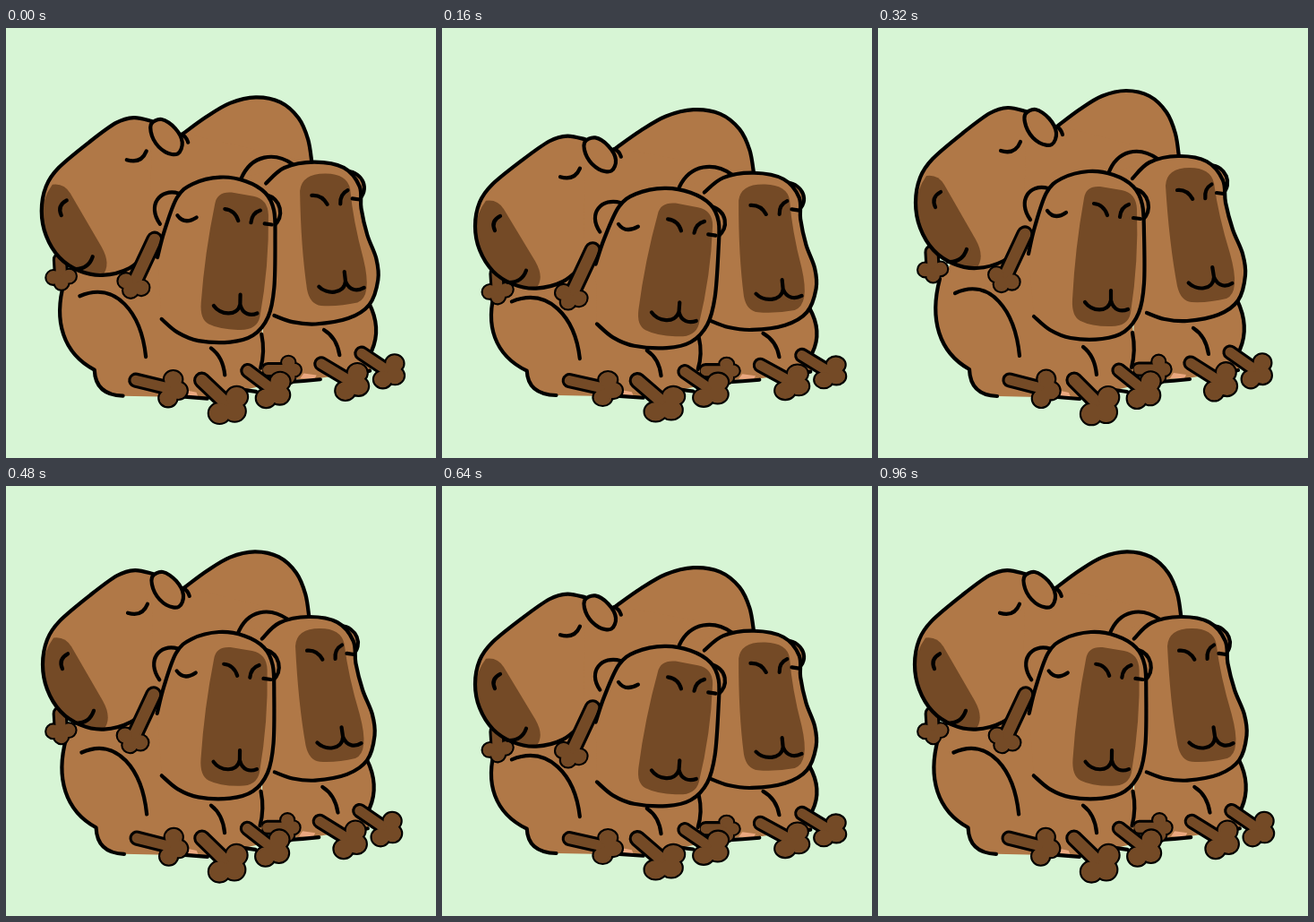
An HTML page that plays this animation: 480x480 px, repeating every 1.04 s.

```html
<!DOCTYPE html>
<html lang="en">
<head>
<meta charset="utf-8">
<title>Dozing capybaras</title>
<style>
  html, body { margin: 0; width: 100%; height: 100%; overflow: hidden; background: #d7f5d5; }
  svg { display: block; width: 100%; height: 100%; }
  path { fill: none; stroke-width: 4.2; stroke-linecap: round; stroke-linejoin: round; vector-effect: non-scaling-stroke; }
  .line { stroke: #000; }
  .fur { fill: #b07847; }
  .dark { fill: #744a26; }
  .pink { fill: #eba880; }
</style>
</head>
<body>
<svg id="stage" viewBox="0 0 480 480"></svg>
<script>
const LOOP = 1040;
const STARTS = [0, 80, 160, 280, 320, 480, 520, 600, 640, 800, 840, 960];

// Amount per pose: 0 is stretched up, 1 is squashed down. Sideways sway lags differently per animal.
const SINK = [.35, .73, 1, .33, 0, .16];
const SWAY = {
  rest: [.45, .85, 1, .3, 0, .2],
  mid: [.3, .9, 1, .7, 0, .2],
  right: [.7, .9, 1, .5, 0, .2]
};

// Full squash at a pivot: how far it moves, and how dx and dy change with x and y.
const head = (at, sway) => ({ at, sway, move: [12, 18], dx: [.05, -.07], dy: [.04, -.05] });
const RULES = {
  midHead: head([250, 190], 'mid'),
  rightHead: head([350, 170], 'right'),
  backHead: { at: [110, 180], sway: 'rest', move: [-5, 27], dx: [0, 0], dy: [0, -.05] },
  backBody: { at: [200, 109], sway: 'rest', move: [-7, 25], dx: [.14, 0], dy: [-.05, 0] },
  paw: { at: [60, 266], sway: 'rest', move: [1, 24], dx: [.03, 0], dy: [-.06, 0] },
  body: { at: [70, 400], sway: 'rest', move: [-9, 0], dx: [.055, 0], dy: [0, -.09] }
};

const stage = document.getElementById('stage');
const layers = [];

function layer(name, ...shapes) {
  const el = document.createElementNS('http://www.w3.org/2000/svg', 'g');
  el.innerHTML = shapes.join('');
  stage.appendChild(el);
  layers.push({ el, rule: RULES[name] });
}

const path = (cls, d, extra = '') => `<path class="${cls}" d="${d}" ${extra}/>`;
const stamp = (x, y, turn, d) => path('line', d, `transform="translate(${x} ${y}) rotate(${turn})"`);

// Smooth curve through a few key points.
function curve(text, closed = false) {
  const p = text.split(' ').map(s => s.split(',').map(Number));
  const n = p.length;
  const at = i => closed ? p[(i + n) % n] : p[Math.max(0, Math.min(n - 1, i))];
  const aim = (a, b, c) => a.map((v, k) => (v + (c[k] - b[k]) / 6).toFixed(2));
  let d = 'M' + p[0];
  for (let i = 0; i < (closed ? n : n - 1); i++) {
    const a = at(i), b = at(i + 1);
    d += `C${aim(a, at(i - 1), b)} ${aim(b, at(i + 2), a)} ${b}`;
  }
  return d + (closed ? 'Z' : '');
}

// A leg ending in three round toes spread around its direction.
function foot(x, y, pawX, pawY, size, width = 13) {
  const dir = Math.atan2(pawY - y, pawX - x);
  const r = 9 * size;
  let toes = '';
  for (const spread of [-1.3, 0, 1.3]) {
    const tx = pawX + 11 * size * Math.cos(dir + spread);
    const ty = pawY + 11 * size * Math.sin(dir + spread);
    toes += `M${tx - r},${ty}a${r},${r} 0 1 1 ${2 * r},0a${r},${r} 0 1 1 ${-2 * r},0`;
  }
  const leg = (color, w) => path('', `M${x},${y}L${pawX},${pawY}`, `style="stroke:${color};stroke-width:${w}"`);
  return leg('#000', width + 4.2) + path('line dark', toes) + leg('#744a26', width - 2) +
    path('dark', toes);
}

const nostrils = (x, y, turn) => stamp(x, y, turn, 'M0,0q11,1 15,13m14,2q1,-11 10,-14');
const mouth = (x, y, turn) => stamp(x, y, turn, 'M-29,2c7,10 26,13 29,-2v-11v11c3,12 12,13 19,10');

// Bodies
layer('body',
  path('fur', 'M286,290L401,300Q418,335 403,360V382L345,391L300,393L285,380Z'),
  path('pink', 'M326,391l4,-6l14,2l-2,4z'),
  path('line', 'M401,304Q415,333 404,359M312,395Q330,394 348,392M352,335Q366,344 369,364M392,384l10,-2'),
  foot(291, 381, 311, 381, .78),
  path('fur', 'M90,250L68,283C58,325 68,362 102,381Q103,410 133,411L225,413L283,400Q288,365 284,330L200,230Z'),
  path('pink', 'M201,410l3,-5l9,2l2,5z'),
  path('line', 'M69,280C57,325 68,362 102,381Q103,410 133,411M200,412L225,414M264,404L278,406'),
  path('line', 'M284,340Q288,360 283,379M229,356Q242,366 244,387'),
  path('line', 'M86,296C125,278 153,315 158,366'));

// Resting animal
layer('paw', foot(60, 250, 61, 267, .82));
layer('backBody',
  path('fur', 'M155,110L201,109L255,76L325,104L336,144L320,200L155,260Z'),
  path('line fur', curve('201,109 225,91 250,76 277,70 303,76 322,94 332,118 336,144')),
  path('line', 'M199,110Q204,112 206,119'));
const backHead = curve('165,93 145,89 125,95 95,117 61,146 47,167 42,195 47,223 62,248 84,263 110,268 140,260 163,240');
layer('backHead',
  path('fur', backHead),
  path('dark', 'M54,165Q67,163 74,175L109,236Q120,256 110,268Q80,270 59,245Q29,200 54,165Z'),
  path('line', backHead),
  path('line', 'M78,261Q94,262 99,247M70,183q-11,6 -6,17M137,137q16,5 22,-10'),
  path('line fur', curve('164,97 176,91 191,101 199,117 194,130 180,128 167,114', true)));

// Right head
layer('rightHead',
  path('line fur', 'M257,163C267,135 292,132 312,146M371,153C388,154 397,174 384,186'),
  path('line fur', curve('284,168 303,150 335,143 367,149 385,170 388,195 396,225 407,252 410,276 402,304 380,320 345,327 320,325 300,318')),
  path('dark', 'M321,176Q322,156 348,156Q371,156 375,173Q380,210 393,252Q405,295 389,302Q369,307 350,306Q338,305 334,288Q325,240 321,176Z'),
  nostrils(334, 181, -11),
  mouth(375, 278, -9),
  path('line', 'M378,184l8,1'));

// Middle head with the arm tucked behind it
layer('paw', foot(164, 230, 142, 277, .9, 15));
layer('midHead',
  path('line fur', 'M170,214C155,193 169,173 190,179M286,179C303,184 307,203 295,215'),
  path('line fur', curve('168,252 175,222 188,184 205,168 235,160 263,164 285,177 295,197 297,230 297,285 291,318 275,339 250,347 215,346 192,337 174,322')),
  path('dark', 'M230,190Q232,176 248,177L272,181Q288,184 289,202Q291,260 282,318Q279,334 258,333Q238,333 226,327Q216,322 217,303Q220,245 230,190Z'),
  nostrils(241, 196, 0),
  mouth(260, 304, 0),
  path('line', 'M189,204q8,11 21,2M285,212l8,1'));

// Feet
layer('body',
  foot(147, 393, 182, 402, 1.05),
  foot(219, 393, 245, 419, 1.25, 15),
  foot(269, 382, 294, 402, 1.15),
  foot(349, 374, 379, 393, 1.15),
  foot(393, 362, 420, 381, 1.05));

function pose(k) {
  for (const { el, rule: { at, sway, move, dx, dy } } of layers) {
    const sx = SWAY[sway][k], sy = SINK[k];
    const shift = (m, d) => m - d[0] * at[0] - d[1] * at[1];
    el.setAttribute('transform', `matrix(${[
      1 + sx * dx[0], sy * dy[0], sx * dx[1], 1 + sy * dy[1],
      sx * shift(move[0], dx), sy * shift(move[1], dy)
    ]})`);
  }
}

let shown = -1;
function tick() {
  const t = performance.now() % LOOP;
  const k = STARTS.findLastIndex(start => t >= start) % SINK.length;
  if (k !== shown) pose(shown = k);
  requestAnimationFrame(tick);
}
tick();
</script>
</body>
</html>
```
